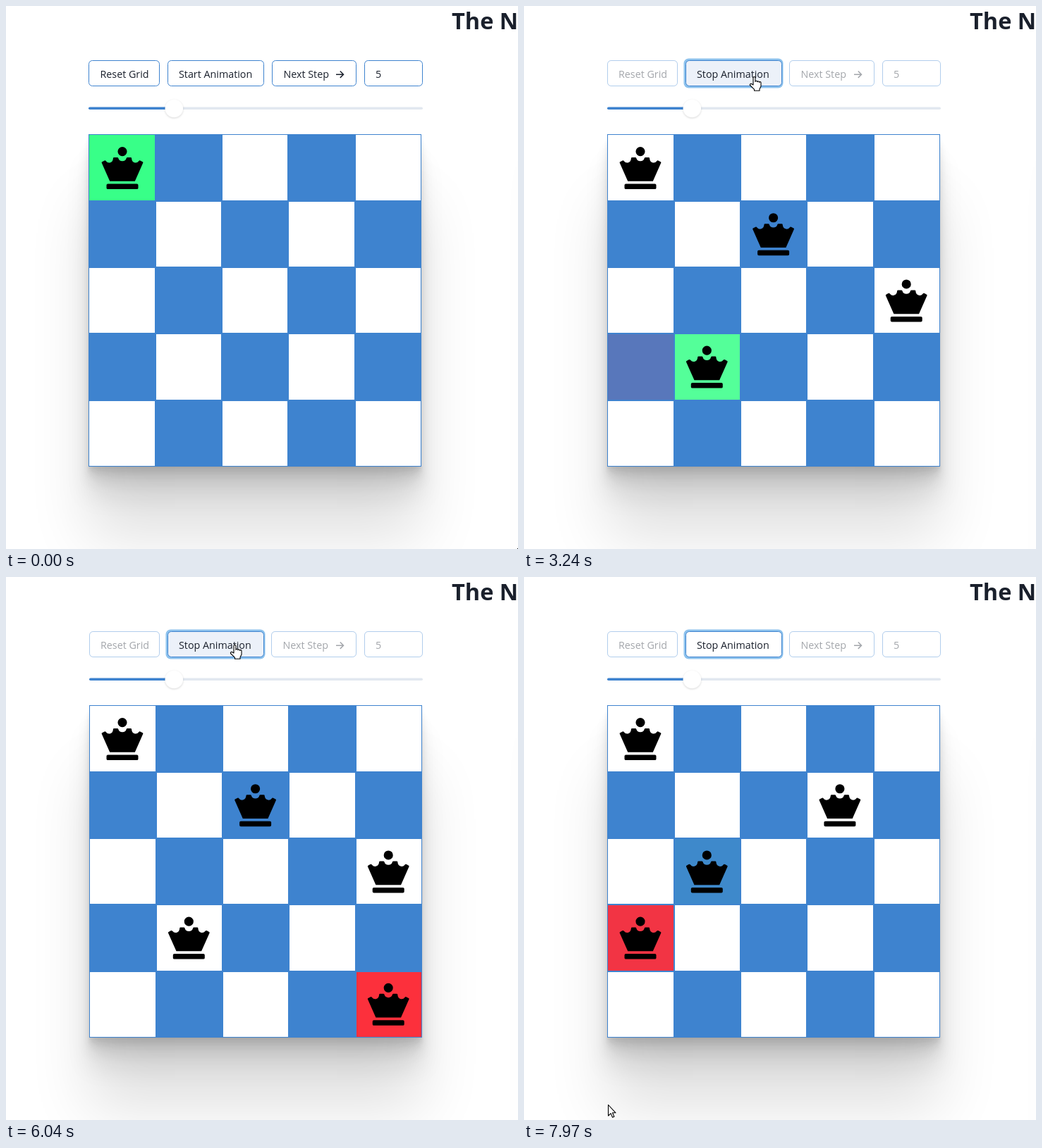
Write an HTML page with a canvas that moves like this. It is 726x771 px and loops after 8 s.

```html
<!DOCTYPE html>
<html lang="en">
<head>
<meta charset="utf-8">
<title>N-Queens</title>
<style>
  html, body { margin: 0; width: 726px; height: 771px; overflow: hidden; background: #fff; }
  canvas { display: block; }
</style>
</head>
<body>
<canvas id="stage" width="726" height="771"></canvas>
<script>
const ctx = document.getElementById('stage').getContext('2d');
const LOOP = 8000, TICK = 200 / 3, SIZE = 5, PITCH = 94.3, TOP = 182;
const FONT = '"Open Sans", "Noto Sans", sans-serif';
const INK = '#1a202c', BLUE = [62, 131, 207], WHITE = [255, 255, 255];
const GREEN = [56, 255, 136], RED = [252, 48, 60];
const CLICK = 500, SOLVED = 4295, RELEASED = 4425, RESTART = 5625, LEAVE = 7450;

const queenPath = new Path2D(
  'M256 0a56 56 0 1 1 0 112a56 56 0 1 1 0-112z' +
  'M80 448H432a16 16 0 0 1 16 16v32a16 16 0 0 1-16 16H80a16 16 0 0 1-16-16v-32a16 16 0 0 1 16-16z' +
  'M8 199A16 16 0 0 1 7 184L36 168a16 16 0 0 1 22 5A48 48 0 0 0 105 191' +
  'C128 187 144 165 144 140a12 12 0 0 1 12-12h39a12 12 0 0 1 12 9A51 51 0 0 0 305 137' +
  'a12 12 0 0 1 12-9h39a12 12 0 0 1 12 12C368 165 384 187 407 191A48 48 0 0 0 454 173' +
  'a16 16 0 0 1 22-5L505 184A16 16 0 0 1 504 199L408 416H104z');
const handPath = new Path2D(
  'M5.5 12V2a1.5 1.5 0 0 1 3 0v5.5a1.4 1.4 0 0 1 2.8 .3a1.4 1.4 0 0 1 2.7 .6' +
  'a1.3 1.3 0 0 1 2.5 .6V14l-2 4v2.3H7v-2L1 12.5a1.5 1.5 0 0 1 2-2z');
const arrowPath = new Path2D('M.5 .5V16l3.6-3.4 2.4 5.7 2.4-1-2.4-5.5H11z');

const clamp = v => Math.min(1, Math.max(0, v));
const bezier = (a, b, c, d, u) =>
  a * (1 - u) ** 3 + 3 * b * u * (1 - u) ** 2 + 3 * c * u * u * (1 - u) + d * u ** 3;
const mix = (a, b, k) => a.map((v, i) => v + (b[i] - v) * k);
const rgb = c => `rgb(${c.map(Math.round)})`;

function ease(p) {
  p = clamp(p);
  let lo = 0, hi = 1;
  for (let i = 0; i < 20; i++) {
    const u = (lo + hi) / 2;
    if (bezier(0, .25, .25, 1, u) < p) lo = u; else hi = u;
  }
  return bezier(0, .1, 1, 1, lo);
}

// Backtracking search: queens[row] = column, the last one being the current try.
function isSafe(queens) {
  const row = queens.length - 1, col = queens[row];
  return queens.slice(0, row).every((c, r) => c !== col && Math.abs(c - col) !== row - r);
}

function advance(queens) {
  const next = queens.slice();
  if (isSafe(next) && next.length < SIZE) return [...next, 0];
  while (next[next.length - 1] === SIZE - 1) next.pop();
  next[next.length - 1]++;
  return next;
}

function buildScenes() {
  const STEP = 283.25;
  let queens = [0];
  const scenes = [];
  const add = (at, marked, fade = 110) => scenes.push({ at, queens, marked, fade, safe: isSafe(queens) });
  const step = (at, ...rest) => { queens = advance(queens); add(at, ...rest); };
  add(-1000, 'last');
  step(585, 'last');
  for (let i = 0; i < 12; i++) step(905 + STEP * i, 'last');
  step(SOLVED, 'all', 200);
  add(RESTART, 'none', 200);
  for (let i = 0; i < 8; i++) step(5905 + STEP * i, 'last');
  return scenes;
}
const scenes = buildScenes();

function cellColor(scene, row, col) {
  const { queens, marked, safe } = scene;
  const isMarked = marked === 'all' || marked === 'last' && row === queens.length - 1;
  if (queens[row] === col && isMarked) return safe ? GREEN : RED;
  return (row + col) % 2 ? BLUE : WHITE;
}

function drawShadow(x, y, w, h) {
  const layers = [[2.8, 2.2, .034], [6.7, 5.3, .048], [12.5, 10, .06],
    [22.3, 17.9, .072], [41.8, 33.4, .086], [100, 80, .12]];
  ctx.save();
  ctx.fillStyle = '#000';
  for (const [dy, blur, alpha] of layers) {
    // The caster sits off stage so that only its shadow shows.
    ctx.shadowColor = `rgba(0,0,0,${alpha})`;
    ctx.shadowBlur = blur;
    ctx.shadowOffsetX = 2000;
    ctx.shadowOffsetY = dy;
    ctx.fillRect(x - 2000, y, w, h);
  }
  ctx.restore();
}

function drawBoard(t, left) {
  const at = scenes.findLastIndex(s => s.at <= t);
  const now = scenes[at], before = scenes[Math.max(0, at - 1)];
  const k = ease((t - now.at) / now.fade);
  const edge = (start, i) => Math.ceil(start + PITCH * i);

  ctx.fillStyle = rgb(BLUE);
  ctx.fillRect(left, TOP, 472, 472);
  for (let row = 0; row < SIZE; row++) {
    for (let col = 0; col < SIZE; col++) {
      const x = edge(left, col) + 1, y = edge(TOP, row) + 1;
      ctx.fillStyle = rgb(mix(cellColor(before, row, col), cellColor(now, row, col), k));
      ctx.fillRect(x, y, edge(left, col + 1) - 1 - x, edge(TOP, row + 1) - 1 - y);
    }
  }
  ctx.fillStyle = '#000';
  now.queens.forEach((col, row) => {
    ctx.save();
    ctx.translate(135 + PITCH * col, 200 + 94.2 * row);
    ctx.scale(60 / 512, 60 / 512);
    ctx.fill(queenPath);
    ctx.restore();
  });
}

function roundRect(x, y, w, h, r) {
  ctx.beginPath();
  ctx.roundRect(x, y, w, h, r);
}

function drawText(text, x, y, font) {
  ctx.font = `${font} ${FONT}`;
  ctx.fillStyle = INK;
  ctx.fillText(text, x, y);
}

function drawBox(left, right, label, textX, { alpha = 1, fill = '#fff', weight = 500 } = {}) {
  ctx.globalAlpha = alpha;
  roundRect(left + .5, 77.5, right - left - 1, 36, 5);
  ctx.fillStyle = fill;
  ctx.fill();
  ctx.strokeStyle = rgb(BLUE);
  ctx.lineWidth = 1;
  ctx.stroke();
  drawText(label, textX, 102, `${weight} 14.3px`);
  ctx.globalAlpha = 1;
}

function drawControls(t, running, left) {
  const busy = t < CLICK ? 0
    : t < RESTART ? 1 - ease((t - RELEASED) / 250)
    : ease((t - RESTART) / 250);
  const alpha = 1 - .6 * busy;
  const shift = running ? 1 : 0;

  drawBox(left, 218, 'Reset Grid', 133.5 + shift / 2, { alpha });

  if (t >= CLICK) {
    ctx.fillStyle = 'rgba(66,153,225,.6)';
    roundRect(226.5, 74.5, 141, 42, 7);
    ctx.fill();
  }
  let fill = WHITE;
  if (t >= CLICK && t < LEAVE) {
    const rest = [236, 241, 249], pressed = [229, 235, 241];
    const k = t < RESTART ? ease((t - SOLVED) / 100) : 1 - ease((t - RESTART) / 200);
    fill = mix(rest, pressed, k);
  } else if (t >= LEAVE) {
    fill = mix([236, 241, 249], WHITE, ease((t - LEAVE) / 200));
  }
  drawBox(229, 366, running ? 'Stop Animation' : 'Start Animation', 245, { fill: rgb(fill) });

  drawBox(377 - shift, 497, 'Next Step', 393.5 - shift, { alpha });
  ctx.globalAlpha = alpha;
  ctx.strokeStyle = INK;
  ctx.lineWidth = 1.5;
  ctx.stroke(new Path2D('M468 97.2H478.5M473.8 92.5L478.5 97.2L473.8 101.9'));
  drawBox(508, 591, '5', 524, { alpha, weight: 400 });
}

function drawSlider(left) {
  ctx.fillStyle = '#e2e8f0';
  roundRect(left, 143.5, 591 - left, 3.6, 2);
  ctx.fill();
  ctx.fillStyle = rgb(BLUE);
  roundRect(left, 143.5, 238 - left, 3.6, 2);
  ctx.fill();
  ctx.save();
  ctx.shadowColor = 'rgba(0,0,0,.16)';
  ctx.shadowBlur = 3;
  ctx.shadowOffsetY = 1;
  ctx.fillStyle = '#fff';
  ctx.beginPath();
  ctx.arc(238.3, 145.5, 12.8, 0, 7);
  ctx.fill();
  ctx.restore();
}

function drawCursor(t) {
  if (t < CLICK) {
    ctx.fillStyle = '#000';
    ctx.fillRect(725, 770, 1, 1);
    return;
  }
  let path = handPath, x = 319.5, y = 100;
  if (t > 5230) { x -= 2; y -= 4; }
  if (t > LEAVE) {
    const u = clamp((t - LEAVE) / 500);
    const s = u * u * (3 - 2 * u);
    path = u > .1 ? arrowPath : handPath;
    x = bezier(x, 640, 700, 119, s);
    y = bezier(y, 250, 700, 749, s);
  }
  ctx.save();
  ctx.translate(x, y);
  ctx.fillStyle = '#fff';
  ctx.fill(path);
  ctx.strokeStyle = '#000';
  ctx.lineWidth = 1.1;
  ctx.lineJoin = 'round';
  ctx.stroke(path);
  ctx.restore();
}

function draw(t) {
  const running = t >= CLICK && t < RELEASED || t >= RESTART;
  const left = running ? 118 : 117;
  ctx.fillStyle = '#fff';
  ctx.fillRect(0, 0, 726, 771);
  drawShadow(left, TOP, 472, 472);
  drawShadow(790, 120, 472, 640);
  drawText('The N', 632, 33, '700 32.5px');
  drawControls(t, running, left);
  drawSlider(left);
  drawBoard(t, left);
  drawCursor(t);
}

let start, shown;
function frame(now) {
  start ??= now;
  // The screen refreshes fifteen times a second.
  const tick = Math.floor(((now - start) % LOOP) / TICK - .5 + 1e-6);
  if (tick !== shown) {
    shown = tick;
    draw((tick + .5) * TICK + .01);
  }
  requestAnimationFrame(frame);
}
requestAnimationFrame(frame);
</script>
</body>
</html>
```
